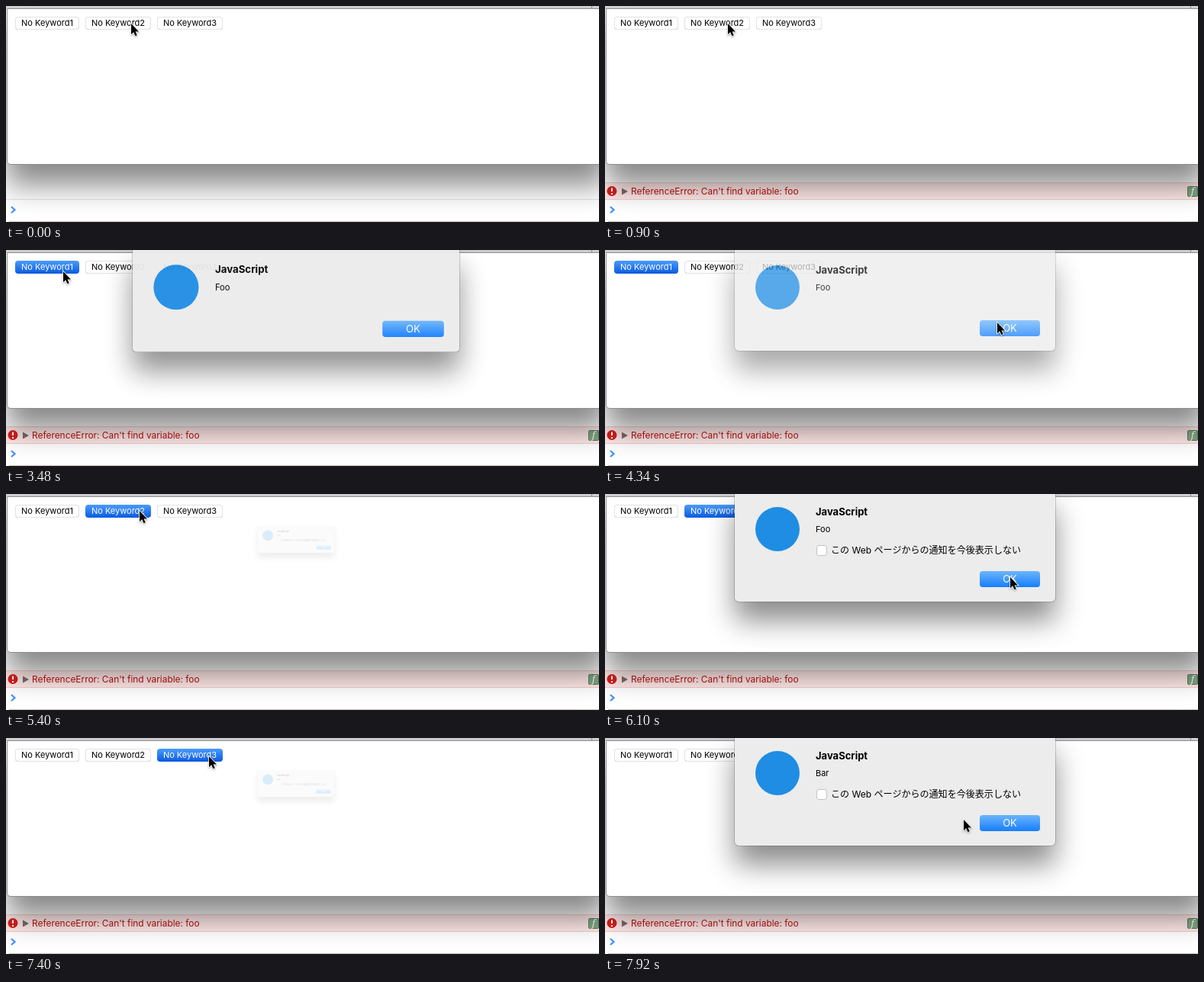
These frames come from a looping animation (777 px wide and 283 px high, 8000 ms). An HTML page:

```html
<!DOCTYPE html>
<html lang="en">
<meta charset="utf-8">
<title>Alert dialogs</title>
<style>
  html, body { margin: 0; width: 100%; height: 100%; overflow: hidden; }
  body { position: relative; background: #fff; color: #000;
    font: 11px/16px Inter, "Noto Sans CJK JP", "Noto Sans CJK", sans-serif; }
  body *, svg { position: absolute; box-sizing: border-box; white-space: nowrap; }
  .bar { inset: 0 0 auto; height: 4px; background: #d3d3d3; }
  .bar i { left: 767px; width: 1px; height: 3px; background: #8f8f8f; }
  .base { inset: 282px 0 auto 4px; height: 1px; background: #c4bbb0; }
  .line { inset: 253px 0 auto; height: 1px; background: #e4e4e4; }
  .error { inset: 231px 0 auto; height: 23px; background: #ffe9e8; color: #bd1111;
    border: solid #f6cccb; border-width: 1px 0; font-size: 11.9px; }
  .error span { left: 34px; top: 3px; }
  .error b { left: 763px; top: 4px; width: 14px; height: 14px; background: #82a684;
    border: 1px solid #55805a; border-radius: 2px; color: #fff;
    font: italic 12px/11px "Noto Serif", serif; text-align: center; }
  .sheet { left: 1px; top: 3px; width: 787px; height: 205px; background: #fff;
    border: 1px solid #8d8d8d; border-radius: 0 0 5px 5px;
    box-shadow: 0 27px 38px rgba(0,0,0,.47); }
  .btn { top: 14px; height: 17px; border-radius: 4px; background: #fff; text-align: center;
    line-height: 17px; box-shadow: inset 0 0 0 1px #e2e2e2, inset 0 -1px #c4c4c4; }
  .btn.on { color: #fff; background: linear-gradient(#4b9bfb, #0a5be0); box-shadow: none; }
  .dialog { left: 170px; width: 420px; top: -2px; height: 134px; background: #ececec;
    border-radius: 0 0 5px 5px; transform-origin: 210px 62px;
    box-shadow: 0 0 0 .6px rgba(0,0,0,.3), 0 25px 36px rgba(0,0,0,.45); }
  .dialog.tall { top: -5px; height: 146px; }
  .icon { left: 27px; top: 22px; width: 58px; height: 58px; border-radius: 50%; background: #1f8de3; }
  .title { left: 106px; top: 20px; font-size: 13px; font-weight: 700; }
  .text { left: 106px; top: 43px; }
  .optOut { display: none; }
  .tall .optOut { display: block; }
  .box { left: 107px; top: 72px; width: 14px; height: 14px; background: #fff;
    border: 1px solid #c4c4c4; border-radius: 3px; }
  .label { left: 126px; top: 71px; font-size: 12.05px; }
  .ok { left: 321px; bottom: 19px; width: 79px; height: 21px; border-radius: 4px; color: #fff;
    font-size: 13px; line-height: 21px; text-align: center;
    background: linear-gradient(#6cb5fb, #167efd); }
  .ok.on { background: linear-gradient(#4b9bfb, #0a5be0); }
  #cursor { left: -3px; top: -3px; filter: drop-shadow(0 1px 1px rgba(0,0,0,.35)); }
</style>
<body>
<div class="bar"><i></i></div>
<div class="base"></div>
<div class="line"></div>
<div class="error" id="error">
  <svg width="34" height="22">
    <circle cx="9" cy="10.5" r="6.5" fill="#d8201f"/>
    <path d="M9 6.5V11M9 13v2" stroke="#fff" stroke-width="2"/>
    <path d="M22 6.5l8 4.5-8 4.5z" fill="#7c6a6a"/>
  </svg>
  <span>ReferenceError: Can't find variable: foo</span><b>f</b>
</div>
<div class="sheet"></div>
<svg width="20" height="24" style="top:255px">
  <path d="M7 8l4.5 4L7 16" fill="none" stroke="#3d8ffb" stroke-width="2.2"/>
</svg>
<div class="btn" style="left:12px;width:84px">No Keyword1</div>
<div class="btn" style="left:104px;width:86px">No Keyword2</div>
<div class="btn" style="left:198px;width:86px">No Keyword3</div>
<div class="dialog" id="dialog">
  <div class="icon"></div>
  <div class="title">JavaScript</div>
  <div class="text" id="text"></div>
  <div class="optOut"><div class="box"></div><div class="label">この Web ページからの通知を今後表示しない</div></div>
  <div class="ok" id="ok">OK</div>
</div>
<svg id="cursor" width="20" height="26">
  <path transform="translate(3 3)" d="M0 0V14.2L3.2 11.3 5.4 16.3 7.8 15.2 5.6 10.4H10Z"
    stroke="#fff" stroke-width="1.6" paint-order="stroke"/>
</svg>
<script>
const LOOP = 8000, STEP = 86.6; // the screen refreshes once per STEP while things move

const glides = [
  { at: 273, steps: 1, x: 161, y: 23 },
  { at: 1893, steps: 5, x: 226, y: 24 },
  { at: 2326, steps: 5, x: 42, y: 24 },
  { at: 2773, steps: 1, x: 44, y: 23 },
  { at: 3393, steps: 6.5, x: 529, y: 98 },
  { at: 4253, steps: 8, x: 175, y: 22 },
  { at: 5487, steps: 7, x: 531, y: 109 },
  { at: 6183, steps: 10, x: 264, y: 25 },
  { at: 7053, steps: 1, x: 266, y: 24 },
  { at: 7400, steps: 6, x: 470, y: 107 },
];

const presses = [
  { button: 1, from: 720, to: 900 },
  { button: 0, from: 3040, to: 4420 },
  { button: 1, from: 5220, to: 6350 },
  { button: 2, from: 7220, to: LOOP },
];

const dialogs = [
  { open: 3220, close: 4340, text: 'Foo' },
  { open: 5400, close: 6270, text: 'Foo', tall: true },
  { open: 7400, close: LOOP, text: 'Bar', tall: true },
];

const [error, dialog, text, ok, cursor] =
  ['error', 'dialog', 'text', 'ok', 'cursor'].map(id => document.getElementById(id));
const buttons = document.querySelectorAll('.btn');

const smooth = k => k * k * (3 - 2 * k);
const stepsSince = (t, start) => Math.floor((t - start) / STEP);

function cursorAt(t) {
  let x = 164, y = 23;
  for (const g of glides) {
    if (t < g.at) break;
    const k = smooth(Math.min(1, stepsSince(t, g.at) / g.steps));
    x += (g.x - x) * k;
    y += (g.y - y) * k;
  }
  return [Math.round(x), Math.round(y)];
}

// Damped spring that overshoots once and settles
const popScale = age => age > 300 ? 1 : 1 - .76 * Math.exp(-age / 98) * Math.cos(age / 60);
const popOpacity = age => age > 300 ? 1 : 1 - .84 * Math.exp(-age / 92);

function drawDialog(t) {
  const d = dialogs.find(d => t >= d.open && t < d.close + 3 * STEP);
  dialog.style.display = d ? '' : 'none';
  if (!d) return;
  const age = stepsSince(t, d.open) * STEP;
  const scale = popScale(age);
  dialog.style.transform = scale === 1 ? 'none' : `scale(${scale})`;
  dialog.style.opacity = t < d.close ? popOpacity(age) : .75 - .25 * stepsSince(t, d.close);
  dialog.classList.toggle('tall', !!d.tall);
  text.textContent = d.text;
  ok.classList.toggle('on', t >= d.close - 150 && t < d.close && !d.tall);
}

function draw(now) {
  const t = now % LOOP;
  const [x, y] = cursorAt(t);
  cursor.style.transform = `translate(${x}px, ${y}px)`;
  error.style.display = t < 900 ? 'none' : '';
  buttons.forEach((el, i) => el.classList.toggle('on',
    presses.some(p => p.button === i && t >= p.from && t < p.to)));
  drawDialog(t);
  requestAnimationFrame(draw);
}
draw(0);
</script>
</body>
</html>
```
